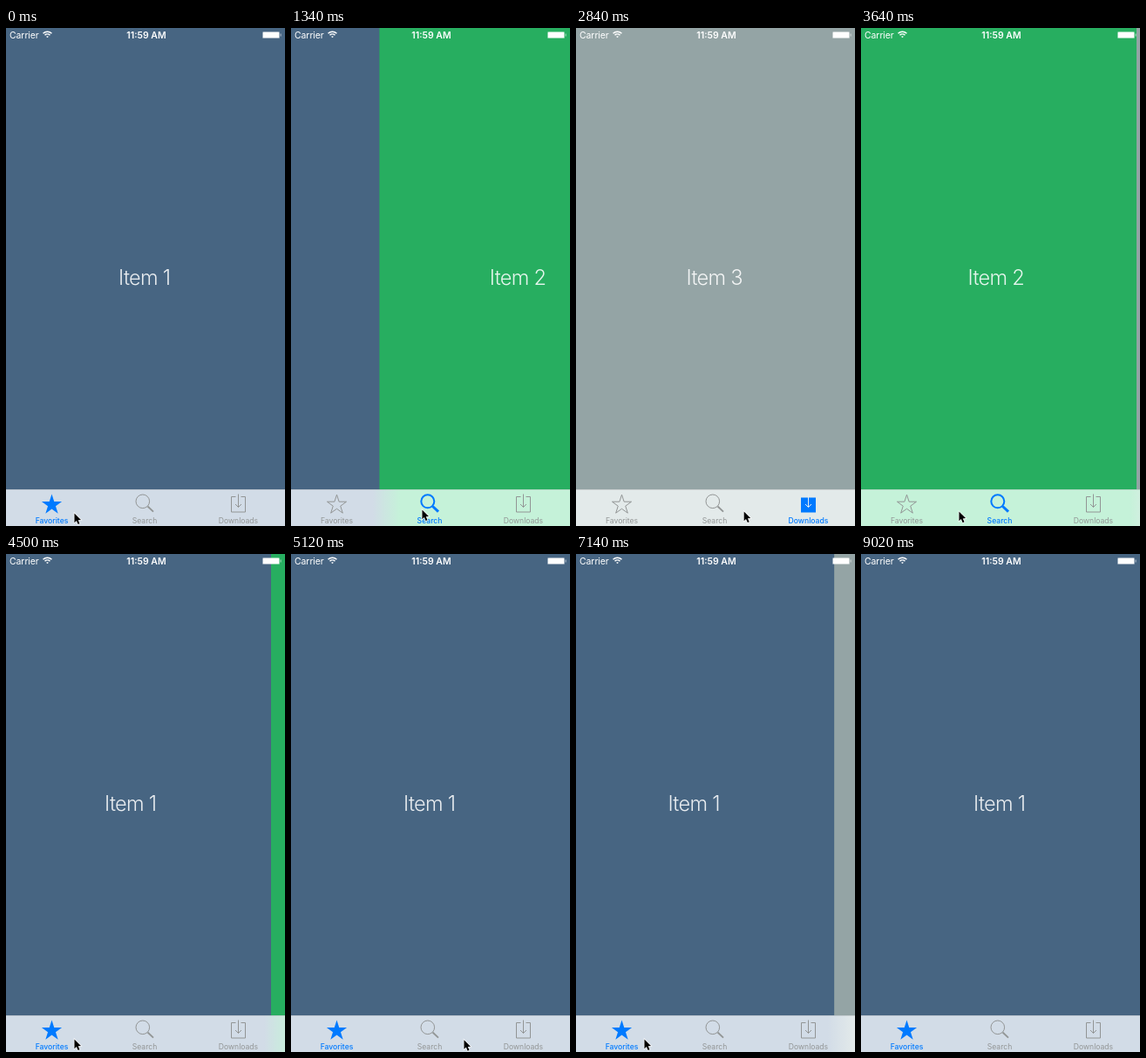
Animation, 320 px wide and 570 px high, one loop 9.04 s. Source, as an HTML page with a canvas:

```html
<!DOCTYPE html>
<html lang="en">
<head>
<meta charset="utf-8">
<title>Tab bar slide</title>
<style>
html, body { margin: 0; width: 100%; height: 100%; overflow: hidden; background: #476582; }
canvas { display: block; width: 320px; height: 570px; }
</style>
</head>
<body>
<canvas id="stage" width="320" height="570"></canvas>
<script>
const ctx = document.getElementById('stage').getContext('2d');
const W = 320, H = 570, BAR = 528;
const LOOP = 9040, SLIDE = 500, TRAVEL = 600, EXIT = 7700;
const FONT = 'Inter, Roboto, sans-serif';
const BLUE = '#007aff', GREY = '#929595';

const tabs = [
  { label: 'Favorites', x: 52.5, icon: star, page: '#476582', bar: '#d2dce7', hover: { x: 78, y: 555 } },
  { label: 'Search', x: 159, icon: lens, page: '#27ae60', bar: '#c5f2d9', hover: { x: 150, y: 551 } },
  { label: 'Downloads', x: 266.5, icon: download, page: '#94a4a5', bar: '#e3eaea', hover: { x: 256, y: 556 } }
];
// The pointer sets off at "go" and presses the tab at "tap"
const visits = [
  { tab: 1, go: 300, tap: 1040 },
  { tab: 2, go: 1580, tap: 2320 },
  { tab: 1, go: 2500, tap: 3180 },
  { tab: 0, go: 3330, tap: 4080 },
  { tab: 2, go: 4750, tap: 5430 },
  { tab: 0, go: 5725, tap: 6737 }
];

const clamp = u => Math.max(0, Math.min(1, u));
const ease = u => u < 0.5 ? 2 * u * u : 1 - 2 * (1 - u) * (1 - u);
const smooth = u => u * u * (3 - 2 * u);

function path(points, close) {
  ctx.beginPath();
  points.forEach(([x, y]) => ctx.lineTo(x, y));
  if (close) ctx.closePath();
}

function line(...points) {
  path(points);
  ctx.stroke();
}

function text(str, x, y, size, weight, color, align = 'center', spacing = 0) {
  ctx.font = `${weight} ${size}px ${FONT}`;
  ctx.letterSpacing = spacing + 'px';
  ctx.textAlign = align;
  ctx.fillStyle = color;
  ctx.fillText(str, x, y);
}

function star(x, on) {
  const size = on ? 12.2 : 11.6;
  path(Array.from({ length: 10 }, (_, i) => {
    const r = size * (i % 2 ? 0.385 : 1), a = i * Math.PI / 5;
    return [x + r * Math.sin(a), 545.8 - r * Math.cos(a)];
  }), true);
  if (on) ctx.fill();
  else ctx.stroke();
}

function lens(x, on) {
  ctx.lineWidth = on ? 2 : 1;
  ctx.beginPath();
  ctx.arc(x - 2.2, 541.8, on ? 7.5 : 7.8, 0, 7);
  ctx.stroke();
  ctx.lineWidth = on ? 3 : 1.8;
  line([x + 3.5, 547.5], [x + 10, 553.7]);
}

function download(x, on) {
  const l = x - 8, r = x + 8, top = 536.5, bottom = 554;
  if (on) {
    ctx.fillRect(l - 0.5, 537.5, 17, 17);
    ctx.strokeStyle = '#e6eeee';
  } else {
    line([x - 3, top], [l, top], [l, bottom], [r, bottom], [r, top], [x + 3, top]);
  }
  line([x, 533.5], [x, 548.5]);
  line([x - 3.5, 545], [x, 548.5], [x + 3.5, 545]);
}

function drawPage(i, x) {
  ctx.fillStyle = tabs[i].page;
  ctx.fillRect(x, 0, W, H);
  text('Item ' + (i + 1), x + 158.7, 293.6, 23.6, 300, 'rgba(255,255,255,.88)', 'center', -0.7);
}

function drawStatus() {
  text('Carrier', 4, 11.7, 10.5, 400, '#fff', 'left', -0.1);
  text('11:59 AM', 161, 11.7, 10.5, 600, '#fff');
  ctx.strokeStyle = '#fff';
  ctx.lineWidth = 1.5;
  for (const r of [1.2, 4.2, 7]) {
    ctx.beginPath();
    ctx.arc(47.5, 11.2, r, -Math.PI * 0.75, -Math.PI * 0.25);
    ctx.stroke();
  }
  ctx.fillStyle = 'rgba(255,255,255,.5)';
  ctx.beginPath();
  ctx.roundRect(294, 4, 20, 8, 1.5);
  ctx.fill();
  ctx.fillRect(314.5, 6.5, 1.2, 3);
  ctx.fillStyle = '#fff';
  ctx.fillRect(295, 5, 18, 6);
}

function drawBar(left, right, edge, active) {
  // The bar shows a softened tint of the pages behind it
  const tint = ctx.createLinearGradient(edge - 8, 0, edge + 24, 0);
  tint.addColorStop(0, tabs[left].bar);
  tint.addColorStop(1, tabs[right].bar);
  ctx.fillStyle = tint;
  ctx.fillRect(0, BAR, W, H - BAR);
  ctx.fillStyle = 'rgba(0,0,0,.18)';
  ctx.fillRect(0, BAR, W, 0.6);
  tabs.forEach((tab, i) => {
    const on = i === active;
    ctx.fillStyle = ctx.strokeStyle = on ? BLUE : GREY;
    ctx.lineWidth = 1;
    tab.icon(tab.x, on);
    text(tab.label, tab.x, 567, 8.6, on ? 500 : 400, on ? BLUE : GREY);
  });
}

function drawPointer(t) {
  let { x, y } = tabs[0].hover;
  for (const { tab, go } of visits) {
    const u = smooth(clamp((t - go) / TRAVEL)), goal = tabs[tab].hover;
    x += (goal.x - x) * u;
    y += (goal.y - y) * u;
  }
  y += 20 * smooth(clamp((t - EXIT) / TRAVEL));
  ctx.save();
  ctx.translate(x, y);
  ctx.scale(0.93, 0.93);
  path([[0.5, 0.5], [0.5, 12], [3, 9.6], [5, 14], [7, 13.1], [5.1, 8.9], [8.6, 8.6]], true);
  ctx.strokeStyle = 'rgba(255,255,255,.9)';
  ctx.lineWidth = 1.5;
  ctx.stroke();
  ctx.fillStyle = '#000';
  ctx.fill();
  ctx.restore();
}

function render(t) {
  let from = 0, to = 0, start = -SLIDE;
  for (const { tab, tap } of visits) {
    if (tap > t) break;
    [from, to, start] = [to, tab, tap];
  }
  const p = ease(clamp((t - start) / SLIDE));
  const forward = to > from;
  const [left, right] = forward ? [from, to] : [to, from];
  const edge = W * (forward ? 1 - p : p);
  drawPage(left, edge - W);
  drawPage(right, edge);
  // Once settled, only the current page tints the bar
  if (p === 1) drawBar(to, to, edge, to);
  else drawBar(left, right, edge, to);
  drawStatus();
  drawPointer(t);
}

const origin = performance.now();
function tick() {
  render((performance.now() - origin) % LOOP);
  requestAnimationFrame(tick);
}
tick();
</script>
</body>
</html>
```
